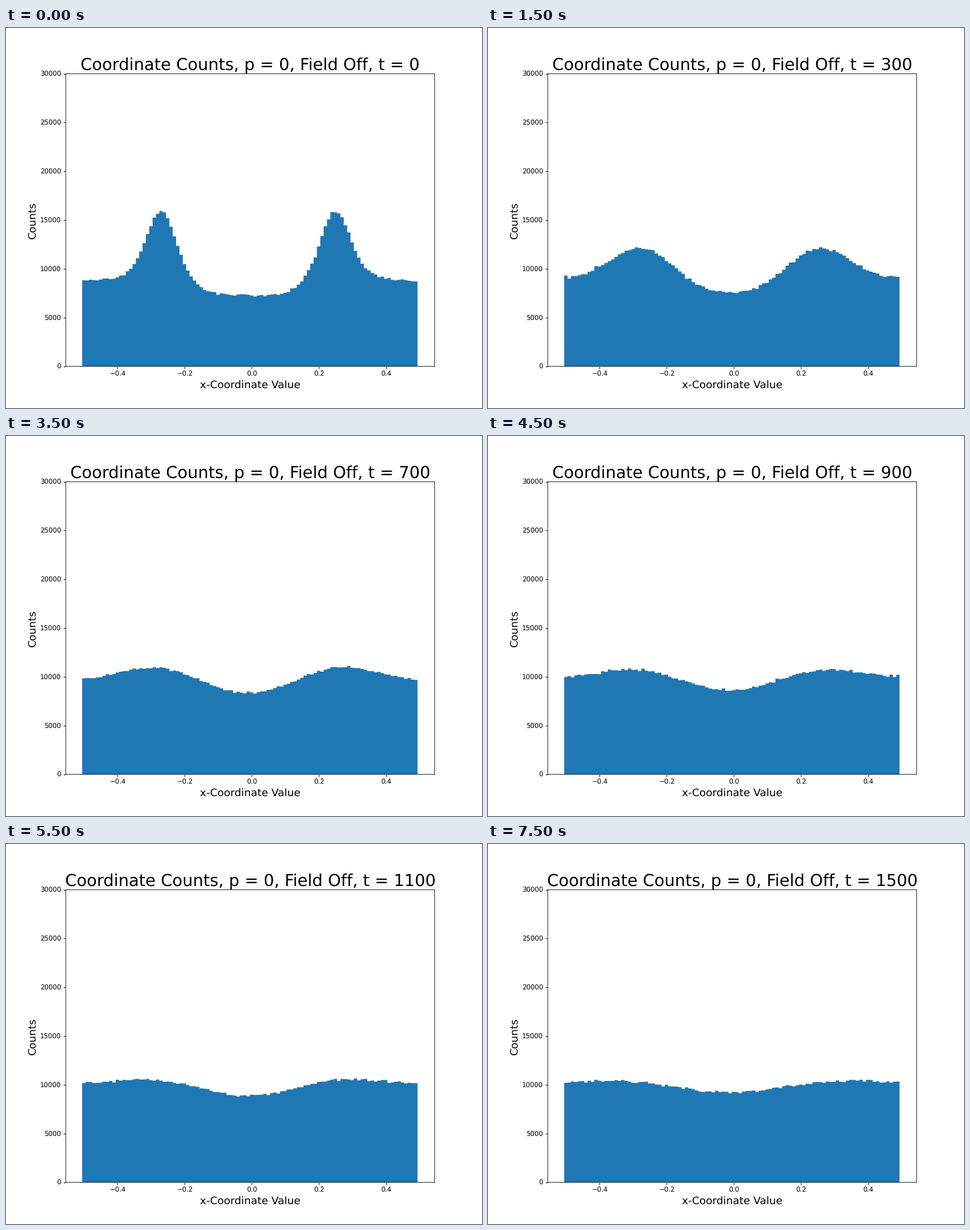
A matplotlib script for the animation above (8 s loop, 837 px wide and 669 px high).

```python
import numpy as np
import matplotlib.pyplot as plt
from matplotlib.animation import FuncAnimation

DPI = 83.7
W, H = 837, 669
HALF = 0.0005          # moves the axes by half a thousandth of the stage
STEPS = 16
STEP_TIME = 100        # simulated time between pictures
BINS = 100
DIFFUSION = 1.1e-5
NOISE = 75

plt.rcParams["path.snap"] = False
plt.rcParams["text.hinting"] = "none"


def profile(x):
    """Two sech² peaks on a floor that is lower between them."""
    u = (x + 0.0095 + 0.5) % 1 - 0.5
    d = np.abs(u) - 0.26
    peak = 7880 / np.cosh(d / 0.0635) ** 2
    floor = 8020 + 790 * np.tanh(d / 0.075) ** 3
    return floor + peak


x = np.arange(BINS) / BINS - 0.5
modes = np.fft.rfft(profile(x))
wave = 2 * np.pi * np.arange(len(modes))


def counts(step):
    """Histogram heights after periodic diffusion, with sampling noise."""
    decay = np.exp(-DIFFUSION * wave ** 2 * step * STEP_TIME)
    rng = np.random.default_rng(step)
    return np.fft.irfft(modes * decay, BINS) + rng.normal(0, NOISE, BINS)


fig, ax = plt.subplots(figsize=((W + 0.01) / DPI, (H + 0.01) / DPI), dpi=DPI)
fig.subplots_adjust(left=0.125 + HALF, right=0.9 + HALF,
                    bottom=0.11 - HALF, top=0.88 - HALF)
hist = ax.stairs(counts(0), np.linspace(-0.506, 0.494, BINS + 1),
                 fill=True, color="#1f77b4")
ax.set_xlim(-0.555, 0.545)
ax.set_ylim(0, 30000)
ax.set_xlabel("x-Coordinate Value", fontsize=16)
ax.set_ylabel("Counts", fontsize=16)
title = ax.set_title("", fontsize=25)


def update(step):
    hist.set_data(counts(step))
    title.set_text(f"Coordinate Counts, p = 0, Field Off, t = {step * STEP_TIME}")
    return hist, title


anim = FuncAnimation(fig, update, frames=STEPS, interval=500, repeat=True)
plt.show()
```
